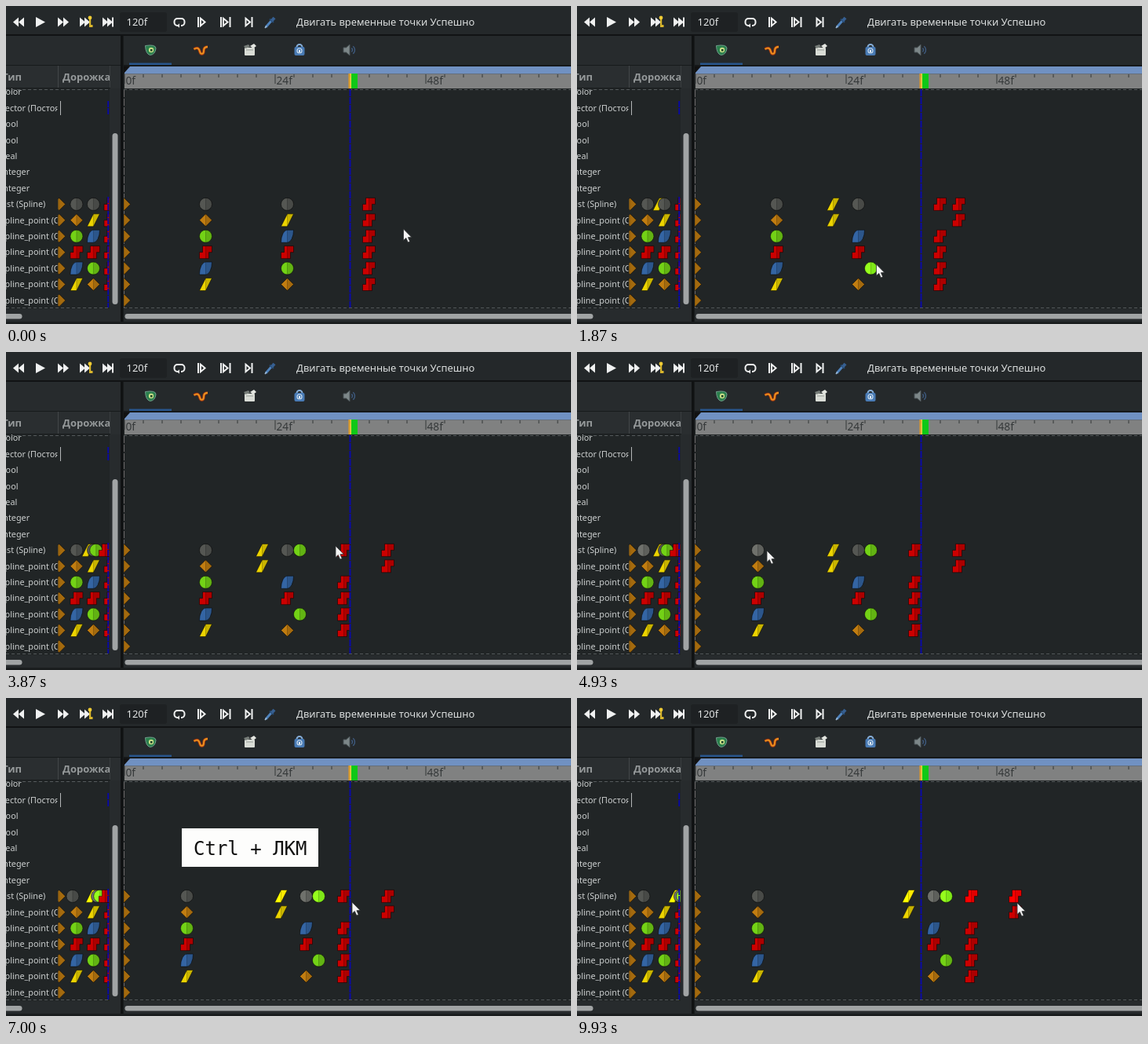
Write an HTML page with a canvas that moves like this. It is 720 by 405 pixels and loops after 9990 ms.

```html
<!DOCTYPE html>
<html lang="ru">
<head>
<meta charset="utf-8">
<title>Timeline</title>
<style>
html, body { margin: 0; width: 100%; height: 100%; overflow: hidden; background: #212526; }
canvas { display: block; width: 720px; height: 405px; }
</style>
</head>
<body>
<canvas id="stage" width="720" height="405"></canvas>
<script>
const ctx = document.getElementById('stage').getContext('2d');
const LOOP = 9990, STEP = 1000 / 15;
const SANS = '"Noto Sans", "Open Sans", sans-serif';
const ORIGIN = 150.5, PX = 8, MINI_ORIGIN = 68.4, MINI_PX = 1.655;
const rowY = i => 252.4 + i * 20.42;

// Pointer path: time, x, y
const path = [
  [0, 506.5, 284], [100, 506, 284], [430, 468, 276], [740, 492, 276],
  [1000, 364, 276], [1270, 333, 276], [1320, 333, 276], [1560, 364, 331],
  [1867, 381.5, 329], [2400, 381.5, 329], [3150, 454, 250], [3720, 420, 247],
  [3960, 420, 247], [4450, 264, 255], [4900, 242, 253], [5070, 242, 253],
  [5400, 330, 256], [5460, 330, 256], [5650, 363, 256], [5710, 363, 256],
  [5900, 379, 256], [6000, 379, 256], [6550, 403, 257], [6680, 403, 257],
  [7000, 441, 260], [7150, 437, 258], [7220, 437, 258], [7470, 491, 257],
  [7600, 491, 257], [8200, 533, 259], [8800, 560, 261], [9990, 561, 261]
];

// Drags: key groups, press time, release time
const drags = [
  ['X', 430, 760], ['Y', 1000, 1310], ['G', 1560, 1990],
  ['R', 3150, 3960], ['A', 4450, 5070],
  ['YMG', 5950, 6670], ['YMGRX', 7550, 9990]
];

const base = { A: 13, Y: 26, M: 26, G: 26, R: 39, X: 39 };
const rows = [
  [['A', 'diamond'], ['Y', 'linear'], ['X', 'step']],
  [['A', 'circle'], ['M', 'leaf'], ['R', 'step']],
  [['A', 'step'], ['M', 'step'], ['R', 'step']],
  [['A', 'leaf'], ['G', 'circle'], ['R', 'step']],
  [['A', 'linear'], ['M', 'diamond'], ['R', 'step']]
];
// Summary row: group, shape, time it becomes visible
const summary = [
  ['A', 'mixed', 0], ['Y', 'linear', 1310], ['M', 'mixed', 0],
  ['G', 'circle', 1990], ['R', 'step', 0], ['X', 'step', 760]
];
const rowPicked = { X: [430, 1000], Y: [1000, 1560], G: [1560, 3150] };
const sumPicked = {
  A: [4450, 5400], Y: [5400, LOOP], M: [5650, LOOP], G: [5900, LOOP],
  R: [7150, LOOP], X: [7470, LOOP]
};
const within = (span, t) => !!span && t >= span[0] && t < span[1];

const colors = {
  mixed: [85, 87, 83],
  circle: [115, 210, 22],
  diamond: [193, 125, 17],
  linear: [237, 212, 0],
  leaf: [52, 101, 164],
  step: [204, 0, 0]
};
const shade = (rgb, k) => `rgb(${rgb.map(v => Math.min(255, Math.round(v * k)))})`;

function pointer(t) {
  let i = 1;
  while (i < path.length - 1 && path[i][0] < t) i++;
  const a = path[i - 1], b = path[i];
  let u = Math.min(1, Math.max(0, (t - a[0]) / (b[0] - a[0])));
  u = u * u * (3 - 2 * u);
  return [a[1] + (b[1] - a[1]) * u, a[2] + (b[2] - a[2]) * u];
}

function frameOf(group, t) {
  let f = base[group];
  for (const [groups, start, end] of drags)
    if (groups.includes(group) && t > start)
      f += Math.round((pointer(Math.min(t, end))[0] - pointer(start)[0]) / PX);
  return f;
}

function rect(x, y, w, h, color) {
  ctx.fillStyle = color;
  ctx.fillRect(x, y, w, h);
}

function pill(x, y, w, h, color, r = Math.min(w, h) / 2) {
  ctx.beginPath();
  ctx.roundRect(x, y, w, h, r);
  ctx.fillStyle = color;
  ctx.fill();
}

function trace(points) {
  ctx.beginPath();
  for (let i = 0; i < points.length; i += 2) ctx.lineTo(points[i], points[i + 1]);
  ctx.closePath();
}

function poly(points, fill, stroke, width = 1) {
  trace(points);
  if (fill) { ctx.fillStyle = fill; ctx.fill(); }
  if (stroke) { ctx.strokeStyle = stroke; ctx.lineWidth = width; ctx.stroke(); }
}

function line(x1, y1, x2, y2, color, width = 1, dash = []) {
  ctx.beginPath();
  ctx.moveTo(x1, y1);
  ctx.lineTo(x2, y2);
  ctx.setLineDash(dash);
  ctx.strokeStyle = color;
  ctx.lineWidth = width;
  ctx.stroke();
  ctx.setLineDash([]);
}

function text(s, x, y, size, color, weight = '', family = SANS) {
  ctx.font = `${weight} ${size}px ${family}`;
  ctx.fillStyle = color;
  ctx.fillText(s, x, y);
}

function clipped(x, y, w, h, draw) {
  ctx.save();
  ctx.beginPath();
  ctx.rect(x, y, w, h);
  ctx.clip();
  draw();
  ctx.restore();
}

function traceKey(shape, r) {
  if (shape === 'diamond') trace([0, -r, r, 0, 0, r, -r, 0]);
  else if (shape === 'linear') trace([-r, r, 0, -r, r, -r, 0, r]);
  else if (shape === 'step')
    trace([-r / 2, -r, r, -r, r, 0, r / 2, 0, r / 2, r, -r, r, -r, 0, -r / 2, 0]);
  else {
    ctx.beginPath();
    if (shape === 'leaf') {
      ctx.ellipse(0, r, r, 2 * r, 0, Math.PI, Math.PI * 1.5);
      ctx.ellipse(0, -r, r, 2 * r, 0, 0, Math.PI / 2);
    } else ctx.arc(0, 0, r, 0, Math.PI * 2);
    ctx.closePath();
  }
}

// The right half of every key is a little darker than the left
function key(shape, x, y, picked) {
  const k = picked ? 1.3 : 1, r = 8;
  const halves = ctx.createLinearGradient(-r, 0, r, 0);
  halves.addColorStop(0.47, shade(colors[shape], k));
  halves.addColorStop(0.53, shade(colors[shape], k * 0.85));
  ctx.save();
  ctx.translate(x, y);
  traceKey(shape, r);
  ctx.fillStyle = halves;
  ctx.fill();
  ctx.strokeStyle = 'rgba(0,0,0,0.5)';
  ctx.lineWidth = 1;
  ctx.stroke();
  line(0, -r, 0, r, 'rgba(0,0,0,0.28)', 0.8);
  ctx.restore();
}

function toolbar() {
  rect(0, 0, 720, 37, '#24282a');
  rect(0, 36, 720, 2, '#111314');
  pill(145, 8, 60, 25, '#1e2123', 3);
  const w = '#f0f1f1';
  const tri = (x, dir, size = 7) =>
    poly([x, 20.5 - size * 0.85, x + dir * size, 20.5, x, 20.5 + size * 0.85], w);
  tri(16, -1); tri(23, -1);
  poly([38, 14, 50, 20.5, 38, 27], w);
  tri(66, 1); tri(73, 1);
  tri(94, 1); tri(100, 1);
  rect(106, 15, 2.2, 12, '#d8b52c');
  ctx.beginPath();
  ctx.arc(107, 15, 2.4, 0, 7);
  ctx.fillStyle = '#efcb35';
  ctx.fill();
  rect(106, 24, 4.5, 3, '#d8b52c');
  tri(123, 1); tri(129, 1);
  rect(135, 14.5, 2, 12, w);
  text('120f', 153.5, 25.2, 13, '#e2e4e4');

  ctx.strokeStyle = w;
  ctx.lineWidth = 2;
  ctx.beginPath();
  ctx.roundRect(214.5, 16, 13, 9, 4);
  ctx.stroke();
  rect(221, 23.5, 2, 3, '#24282a');
  poly([218, 25, 221, 22.3, 221, 27.7], w);

  const bar = x => rect(x, 14, 2, 13, w);
  const hollow = x => poly([x, 15.8, x + 5.5, 20.5, x, 25.2], null, w, 2);
  bar(244); hollow(248);
  bar(273); hollow(277); bar(284.5);
  hollow(305.5); bar(312.5);

  line(331, 27, 338, 19, '#4f83bd', 3);
  line(330, 28, 332, 25.5, '#a7c1da', 1.5);
  line(336, 16.5, 341, 21, '#25476d', 2.2);
  line(338.5, 19, 342, 15, '#365f91', 4);
  text('Двигать временные точки Успешно', 370, 25.2, 12.85, '#dcdfdf');
}

function tabs() {
  rect(150, 38, 570, 38, '#25292b');
  rect(157, 72.5, 54, 2.5, '#28558c');
  rect(150, 75, 570, 2, '#15181a');

  ctx.beginPath();
  ctx.moveTo(177.5, 50.5);
  ctx.quadraticCurveTo(191, 48.5, 191, 54);
  ctx.quadraticCurveTo(190, 62, 183.5, 62.5);
  ctx.quadraticCurveTo(178, 61, 177.5, 50.5);
  ctx.fillStyle = '#2a7f4c';
  ctx.fill();
  ctx.strokeStyle = '#6f9d8c';
  ctx.lineWidth = 1;
  ctx.stroke();
  ctx.beginPath();
  ctx.arc(185, 56, 3.2, 0, 7);
  ctx.fillStyle = '#c4dc86';
  ctx.fill();
  rect(184, 55, 2.5, 2.5, '#193d28');

  const wave = (color, width) => {
    ctx.beginPath();
    ctx.moveTo(239.5, 55);
    ctx.bezierCurveTo(244, 52, 246, 54, 247, 58);
    ctx.bezierCurveTo(248, 62, 252, 62, 252, 57);
    ctx.bezierCurveTo(252, 53, 254, 52, 257, 52);
    ctx.strokeStyle = color;
    ctx.lineWidth = width;
    ctx.stroke();
  };
  wave('#a8380f', 3.6);
  wave('#ea9420', 1.8);

  pill(304, 53, 13, 10, '#d9dcd6', 1);
  poly([303, 51, 309, 49, 311, 52, 305, 54], '#777d79');
  poly([311, 51, 316, 48, 319, 51, 315, 54], '#e4e6e1');
  line(306, 56, 315, 56, '#999f99', 1);

  ctx.beginPath();
  ctx.arc(374, 52.5, 3.5, Math.PI, 0);
  ctx.strokeStyle = '#86aed8';
  ctx.lineWidth = 2;
  ctx.stroke();
  pill(367.5, 52, 13, 11, '#497bb5', 2);
  ctx.beginPath();
  ctx.arc(374, 57, 3, 0, 7);
  ctx.strokeStyle = '#cfdfee';
  ctx.lineWidth = 1.2;
  ctx.stroke();
  rect(373, 56, 2, 3, '#e7eff6');

  poly([430, 53, 433.5, 53, 438, 49, 438, 63, 433.5, 59, 430, 59], '#7d8789', '#4c5558');
  ctx.strokeStyle = '#3f5b80';
  ctx.lineWidth = 1.4;
  for (const r of [3, 6]) {
    ctx.beginPath();
    ctx.arc(438.5, 56, r, -0.9, 0.9);
    ctx.stroke();
  }
}

function ruler() {
  rect(151, 77, 569, 9.5, '#7091c2');
  rect(151, 86.5, 569, 18.5, '#808181');
  for (let f = 0; f <= 72; f += 3) {
    const major = f % 24 === 0;
    line(ORIGIN + f * PX + 0.5, 87, ORIGIN + f * PX + 0.5, major ? 99 : 91, '#333737');
  }
  ['0f', '24f', '48f'].forEach((s, i) =>
    text(s, 152.5 + i * 192, 100.2, 13.7, '#35393a'));
  poly([150, 77, 158, 77, 150, 86], '#111');
  rect(436.5, 86, 2, 19, '#e59a22');
  rect(438.5, 86, 1.5, 19, '#f0d83c');
  rect(440, 86, 8, 19, '#10c817');
}

function leftPanel() {
  rect(0, 38, 146, 37, '#272b2d');
  rect(0, 75, 146, 30, '#2a2e30');
  rect(0, 75, 146, 1, '#171a1b');
  rect(0, 104, 133, 1, '#191c1d');
  rect(66, 76, 1, 28, '#434749');
  rect(132, 76, 1, 28, '#3a3e40');
  ctx.textAlign = 'right';
  text('Тип', 20, 95, 13, '#95999a', 'bold');
  ctx.textAlign = 'left';
  clipped(67, 76, 65, 28, () => text('Дорожка', 72, 95, 13, '#95999a', 'bold'));

  const names = ['Color', 'Vector (Постоянный)', 'Bool', 'Bool', 'Real',
    'Integer', 'Integer', 'List (Spline)'];
  for (let i = 0; i < 6; i++) names.push('Spline_point (Составной)');
  clipped(0, 105, 65.5, 279, () => names.forEach((s, i) =>
    text(s, -7.4, rowY(i - 7) + 3.8, 10.8, '#cdd0d0')));

  rect(132, 105, 14, 281, '#272b2d');
  pill(135.5, 162, 7, 218, '#a1a4a5');
  rect(0, 386, 146, 19, '#272b2d');
  pill(-8, 392, 28.5, 6.5, '#a1a4a5');
  line(0, 106.5, 132, 106.5, '#53585a', 1, [4, 3]);
  line(0, 384.5, 132, 384.5, '#53585a', 1, [4, 3]);
}

function miniTracks(t) {
  clipped(66.5, 105, 65, 279, () => {
    rect(69, 121, 1, 18, '#b4b7b7');
    for (let i = 0; i <= 6; i++) key('diamond', MINI_ORIGIN - 0.7, rowY(i));
    for (const [group, shape, shown] of summary)
      if (t >= shown)
        key(shape, MINI_ORIGIN + frameOf(group, t) * MINI_PX, rowY(0), within(sumPicked[group], t));
    rows.forEach((keys, i) => keys.forEach(([group, shape]) =>
      key(shape, MINI_ORIGIN + base[group] * MINI_PX, rowY(i + 1))));
    line(130.3, 121, 130.3, 139, '#0808a8', 2, [8, 1]);
    line(130.3, 243, 130.3, 384, '#0808a8', 2, [8, 1]);
  });
}

function tracks(t) {
  line(150, 106.5, 720, 106.5, '#53585a', 1, [4, 3]);
  line(150, 384.5, 720, 384.5, '#53585a', 1, [4, 3]);
  line(150.5, 107, 150.5, 384, '#6c686a', 1, [9, 2]);
  const at = group => ORIGIN + frameOf(group, t) * PX;
  clipped(150, 105, 570, 279, () => {
    for (let i = 0; i <= 6; i++) key('diamond', ORIGIN, rowY(i));
  });
  for (const [group, shape, shown] of summary)
    if (t >= shown) key(shape, at(group), rowY(0), within(sumPicked[group], t));
  rows.forEach((keys, i) => keys.forEach(([group, shape]) =>
    key(shape, at(group), rowY(i + 1), within(rowPicked[group], t))));
  line(438.5, 106, 438.5, 384, '#0a0aa6', 2, [9, 1]);
}

function arrow([x, y]) {
  ctx.save();
  ctx.translate(x, y);
  ctx.lineJoin = 'round';
  poly([0, 0, 0, 14.5, 3.3, 11.5, 5.8, 17, 8.2, 16, 5.9, 10.7, 10.3, 10.5],
    '#f4f4f4', '#303334', 0.8);
  ctx.restore();
}

function hint() {
  rect(224, 166, 174, 49, '#fdfdfc');
  text('Ctrl + ЛКМ', 239, 200, 24, '#101010', '', '"DejaVu Sans Mono", monospace');
}

function render(t) {
  rect(0, 0, 720, 405, '#212526');
  toolbar();
  tabs();
  ruler();
  leftPanel();
  miniTracks(t);
  tracks(t);
  rect(150, 386, 570, 19, '#272b2d');
  pill(151.5, 392, 580, 6.5, '#a1a4a5');
  rect(146, 38, 3.5, 367, '#101213');
  rect(0, 402, 720, 3, '#1a1d1e');
  if (t >= 5190 && t < 8950) hint();
  arrow(pointer(t));
}

function tick() {
  const t = performance.now() % LOOP;
  render(Math.floor((t + 4) / STEP) * STEP);
  requestAnimationFrame(tick);
}
tick();
</script>
</body>
</html>
```
